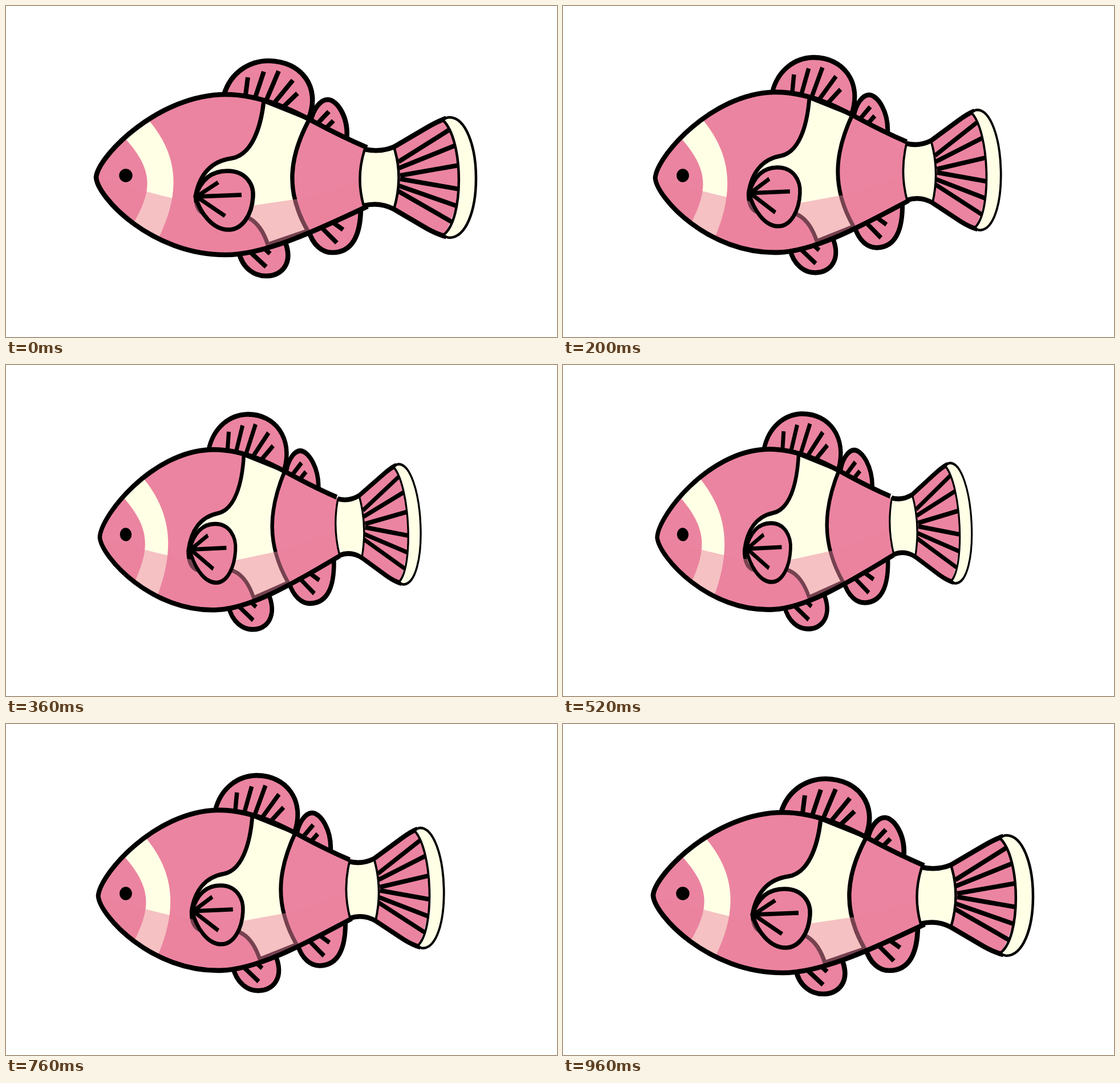
Animation of 966x580 px, one loop 1 s. Source, as an HTML page:

```html
<!DOCTYPE html>
<html lang="en">
<head>
<meta charset="utf-8">
<title>Swimming fish</title>
<style>
  html, body { margin: 0; width: 100%; height: 100%; overflow: hidden; background: #fff; }
  svg { display: block; width: 966px; height: 580px; }
  .pink { fill: #eb84a0; }
  .cream { fill: #ffffe6; }
  .line { stroke: #000; stroke-width: 8.6; }
  .none { fill: none; }
  .thin { stroke-width: 4.5; }
  .mid { stroke-width: 7.4; }
  .ray { stroke-width: 8; }
</style>
</head>
<body>
<svg viewBox="0 0 966 580" stroke-linejoin="round">
  <defs>
    <path id="hull" d="M633 248C605 236 570 219 540 203C510 187 450 155 385 155C268 155 162 262 158 300C160 335 255 436 385 436C460 436 560 385 634 351"/>
    <clipPath id="inside"><use href="#hull"/></clipPath>
  </defs>

  <g id="body">
    <g class="pink line">
      <path d="M382 156C394 115 428 96 461 96C518 97 552 142 531 196"/>
      <path d="M534 203C538 180 552 164 564 164C580 164 602 195 597 236"/>
      <path d="M408 430C414 460 436 473 455 473C482 474 506 452 488 410"/>
      <path d="M530 392C538 420 555 432 572 432C607 432 622 402 622 352"/>
    </g>
    <path class="none line ray" d="M424 125L420 156M452 115L437 160M478 114L456 166M503 130L471 169M511 153L487 176
      M566 185L546 206M574 201L562 213M427 430L456 457M453 425L463 434M552 387L580 415M570 377L591 392"/>

    <use href="#hull" class="pink"/>
    <g clip-path="url(#inside)">
      <path class="cream" d="M207 230L250 200C305 265 305 330 267 408L223 382C255 325 262 290 207 230"/>
      <path class="cream line mid" d="M452 166C446 220 428 262 395 267C360 272 340 295 333 330C331 365 350 370 380 365C420 360 445 375 459 418L529 394C489 325 496 265 532 198Z"/>
      <path class="pink" opacity=".5" d="M150 300C240 320 340 361 437 349L512 338Q570 325 640 300V450H150Z"/>
    </g>
    <use href="#hull" class="none line"/>
    <circle cx="210" cy="297" r="11.7"/>

    <g id="tail">
      <path class="pink" d="M680 247L738 213Q755 203 768 200Q822 300 768 402Q755 399 738 390L680 356Z"/>
      <path class="none line ray" d="M688 273L777 217M689 284L786 245M691 297L794 279M691 303L795 321M689 315L789 350M687 324L781 378"/>
      <path class="cream line thin" d="M629 251Q655 257 680 247Q697 300 680 356Q655 343 627 350Q613 300 629 251Z"/>
      <path class="none line" d="M629 251Q655 257 680 247L738 213Q758 201 772 197M627 350Q655 343 680 356L738 390Q758 401 772 404"/>
      <path class="cream line thin" d="M766 200Q772 195 778 195C806 196 824 245 824 302C824 360 806 405 778 406Q772 406 767 401C803 375 803 235 766 200Z"/>
    </g>
  </g>

  <g id="fin">
    <path class="pink line mid" d="M332 334C342 303 361 289 388 289C420 289 435 312 433 335C431 365 415 392 390 392C362 392 340 362 332 334Z"/>
    <path class="none line mid" d="M372 309L334 334L413 331M334 334L384 368"/>
  </g>
</svg>
<script>
  const FRAME = 40, COUNT = 25, HALF = 12;
  const body = document.getElementById('body');
  const tail = document.getElementById('tail');
  const fin = document.getElementById('fin');

  // Near-linear start, soft stop at the far end of the turn.
  const ease = p => {
    const q = 1 - p;
    return 0.93 * q * q * p + 3 * q * p * p + p * p * p;
  };

  function draw(time) {
    const step = Math.floor(time / FRAME) % COUNT;
    const u = ease(1 - Math.abs(step - HALF) / HALF);
    body.setAttribute('transform',
      `translate(210 297) rotate(${-2.85 * u}) scale(${1 - 0.135 * u} 1) translate(-210 -297)`);
    tail.setAttribute('transform',
      `translate(666 0) scale(${1 - 0.19 * u} 1) translate(-666 0)`);
    fin.setAttribute('transform',
      `translate(${382.5 - 22.8 * u} ${-12 * u}) scale(${1 - 0.233 * u} 1) translate(-382.5 0)`);
  }

  const start = performance.now();
  function tick() {
    draw(performance.now() - start);
    requestAnimationFrame(tick);
  }
  draw(0);
  requestAnimationFrame(tick);
</script>
</body>
</html>
```
